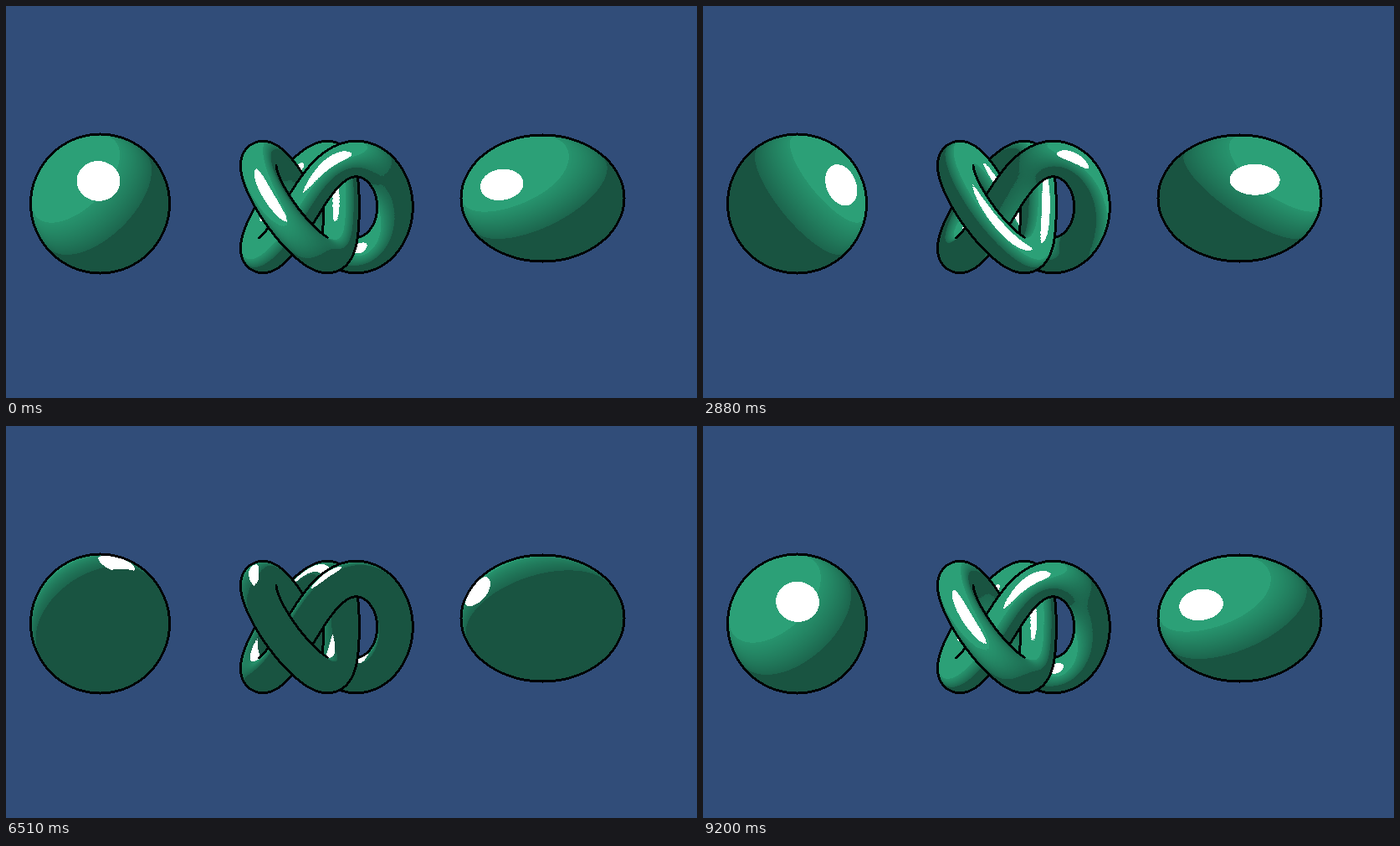
Animation, 826 px wide and 468 px high, one loop 9270 ms. Source, as an HTML page with a canvas:

```html
<!DOCTYPE html>
<html lang="en">
<head>
<meta charset="utf-8">
<title>Toon shading</title>
<style>
  html, body { margin: 0; width: 100%; height: 100%; overflow: hidden; background: #314d79; }
  canvas { display: block; width: 826px; height: 468px; }
</style>
</head>
<body>
<canvas id="stage" width="826" height="468"></canvas>
<script>
const W = 826, H = 468, LOOP = 9270, FAR = -1e4;
const BACKGROUND = [49, 77, 121], INK = [0, 0, 0], WHITE = [255, 255, 255];
const DARK = [25, 84, 65], RAMP_LOW = [28, 101, 77], RAMP_HIGH = [39, 147, 109], BRIGHT = [44, 160, 119];
const SHADE_EDGE = 0.08, BRIGHT_EDGE = 0.6, GLOSS_EDGE = 0.941;
const EYE = { x: 413, y: 260, z: 450 };
const RAD = Math.PI / 180;

const ctx = document.getElementById('stage').getContext('2d');
const image = ctx.createImageData(W, H);
const depth = new Float32Array(W * H).fill(FAR);
const normals = new Float32Array(W * H * 3);

// Writes a ball or upright ellipsoid into the depth and normal buffers.
function addBall(cx, cy, cz, rx, ry = rx) {
  for (let y = Math.ceil(cy - ry); y <= cy + ry; y++) {
    for (let x = Math.ceil(cx - rx); x <= cx + rx; x++) {
      const u = (x - cx) / rx, v = (cy - y) / ry, ww = 1 - u * u - v * v;
      if (ww < 0) continue;
      const w = Math.sqrt(ww), z = cz + w * rx, i = y * W + x;
      if (z <= depth[i]) continue;
      depth[i] = z;
      const ny = v * rx / ry, length = Math.hypot(u, ny, w);
      normals.set([u / length, ny / length, w / length], i * 3);
    }
  }
}

// A trefoil tube seen from the side.
function addKnot(cx, cy, tube) {
  const steps = 4000;
  for (let k = 0; k < steps; k++) {
    const t = k / steps * 2 * Math.PI;
    const x = 63 * Math.cos(2 * t) + 26 * Math.cos(t) + 6 * Math.cos(5 * t);
    const z = 63 * Math.sin(2 * t) - 26 * Math.sin(t) + 6 * Math.sin(5 * t);
    addBall(cx + x, cy - 57.5 * Math.sin(3 * t), z, tube);
  }
}

function paint(i, color) {
  image.data.set(color, i * 4);
  image.data[i * 4 + 3] = 255;
}

// Ink goes on every pixel that has a much nearer surface close by.
function isOutline(i) {
  for (let dy = -3; dy <= 3; dy++) {
    for (let dx = -3; dx <= 3; dx++) {
      if (dx * dx + dy * dy < 10 && depth[i + dy * W + dx] - depth[i] > 26) return true;
    }
  }
  return false;
}

addBall(112, 235.5, 0, 81.5);
addKnot(369.5, 239.5, 19.8);
addBall(641, 229, 0, 96, 74);

const surface = [];
for (let i = 0; i < W * H; i++) {
  if (isOutline(i)) paint(i, INK);
  else if (depth[i] === FAR) paint(i, BACKGROUND);
  else surface.push(i);
}

const mix = (a, b, t) => a.map((c, k) => c + (b[k] - c) * t);
const ramp = Array.from({ length: 65 }, (_, k) => mix(RAMP_LOW, RAMP_HIGH, k / 64));

function toon(light) {
  if (light < SHADE_EDGE) return DARK;
  if (light > BRIGHT_EDGE) return BRIGHT;
  return ramp[Math.round((light - SHADE_EDGE) / (BRIGHT_EDGE - SHADE_EDGE) * 64)];
}

function draw(ms) {
  const turn = (-48 + 0.0397 * ms) * RAD, rise = 37 * RAD;
  const lx = Math.cos(rise) * Math.sin(turn);
  const ly = Math.sin(rise);
  const lz = Math.cos(rise) * Math.cos(turn);

  for (const i of surface) {
    const nx = normals[i * 3], ny = normals[i * 3 + 1], nz = normals[i * 3 + 2];
    const light = nx * lx + ny * ly + nz * lz;
    const vx = EYE.x - i % W, vy = (i / W | 0) - EYE.y, vz = EYE.z;
    const distance = Math.sqrt(vx * vx + vy * vy + vz * vz);
    const hx = lx + vx / distance, hy = ly + vy / distance, hz = lz + vz / distance;
    const gloss = (nx * hx + ny * hy + nz * hz) / Math.sqrt(hx * hx + hy * hy + hz * hz);
    paint(i, light > 0 && gloss > GLOSS_EDGE ? WHITE : toon(light));
  }
  ctx.putImageData(image, 0, 0);
}

const start = performance.now();
function frame() {
  draw((performance.now() - start) % LOOP);
  requestAnimationFrame(frame);
}
frame();
</script>
</body>
</html>
```
